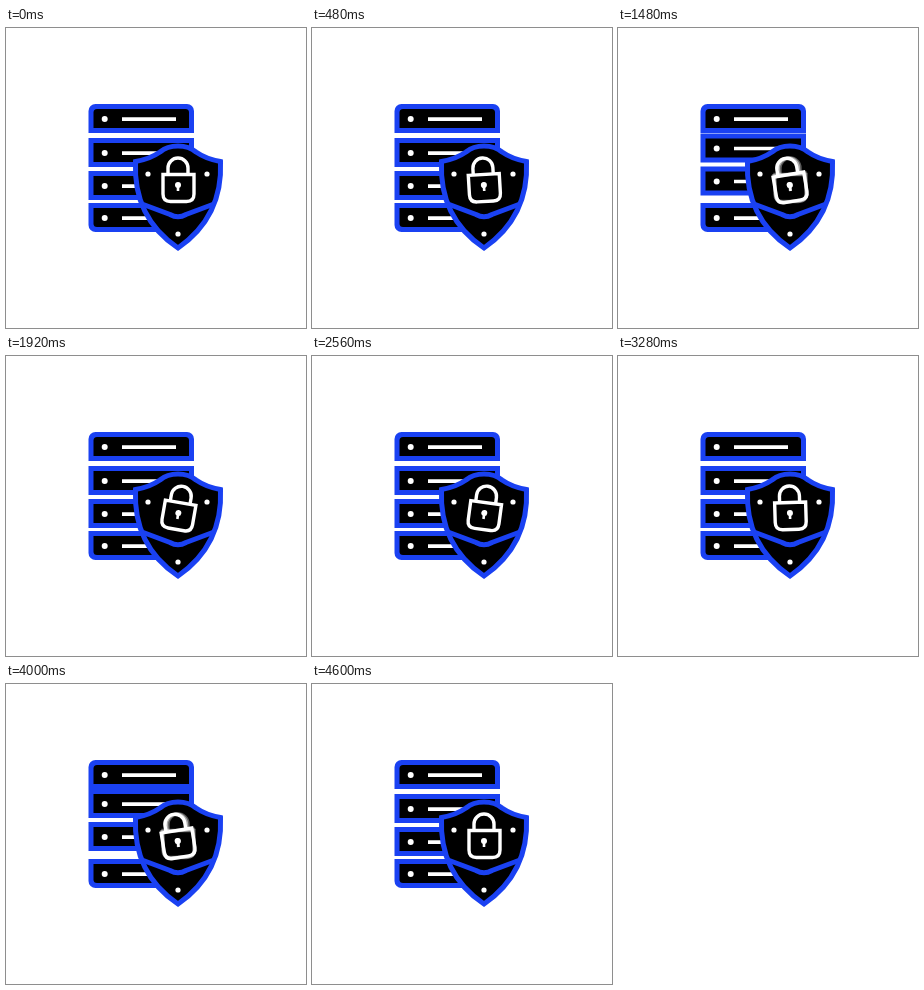
Animation, 300 px wide and 300 px high, one loop 4880 ms. Source, as an HTML page with a canvas:

```html
<!DOCTYPE html>
<html lang="en">
<head>
<meta charset="utf-8">
<title>Server security</title>
<style>
html, body { margin: 0; width: 100%; height: 100%; overflow: hidden; background: #fff; }
canvas { display: block; width: 300px; height: 300px; }
</style>
</head>
<body>
<canvas id="stage"></canvas>
<script>
const LOOP = 4880, HALF = 2440, STEP = 40;
const SWING = 864, SWING_END = 2160, TILT = 10 * Math.PI / 180;
const SHIFT = 5, SHIFT_START = 840, SHIFT_END = 1700;
const BLUE = '#1a41f2', BLACK = '#000', WHITE = '#fff';

const canvas = document.getElementById('stage');
const ratio = window.devicePixelRatio || 1;
canvas.width = canvas.height = 300 * ratio;
const ctx = canvas.getContext('2d');
ctx.scale(ratio, ratio);

const shield = new Path2D(
  'M172 118 Q183 118 190 124 Q200 131 214.5 133.5 C216 166 205 197 172 220 ' +
  'C138 197 128 166 129.5 133.5 Q144 131 154 124 Q161 118 172 118Z');
const chevron = new Path2D('M136 176 L164 186.5 Q172 191 180 186.5 L208 176');
const shackle = new Path2D('M162 146 V140 A10 10 0 0 1 182 140 V146');
const body = new Path2D('M157 146.5 H188 V166 Q188 173.5 180.5 173.5 H164.5 Q157 173.5 157 166Z');
const stem = new Path2D('M172 158 V163');

function dot(x, y, r) {
  ctx.fillStyle = WHITE;
  ctx.beginPath();
  ctx.arc(x, y, r, 0, 2 * Math.PI);
  ctx.fill();
}

function line(path, color, width) {
  ctx.strokeStyle = color;
  ctx.lineWidth = width;
  ctx.stroke(path);
}

function box(x, y, w, h, radii, color) {
  ctx.fillStyle = color;
  ctx.beginPath();
  ctx.roundRect(x, y, w, h, radii);
  ctx.fill();
}

function drawBar(y, top, bottom) {
  const radii = r => [top * r, top * r, bottom * r, bottom * r];
  box(82.5, y, 105.5, 29, radii(7), BLUE);
  box(87.5, y + 5, 95.5, 19, radii(3.5), BLACK);
  dot(98.7, y + 15, 3);
  box(116, y + 13.3, 54, 3.6, 0, WHITE);
}

function drawLock(angle, alpha) {
  ctx.save();
  ctx.globalAlpha = alpha;
  ctx.translate(172, 159);
  ctx.rotate(angle);
  ctx.translate(-172, -159);
  line(shackle, WHITE, 3.4);
  line(body, WHITE, 3.4);
  dot(172, 157, 3);
  line(stem, WHITE, 2.6);
  ctx.restore();
}

// Quick push down, slow glide up, quick return; antisymmetric in time.
function barShift(t) {
  if (t <= SHIFT_START || t >= SHIFT_END) return 0;
  const edge = 140;
  const quick = d => SHIFT * Math.sin(Math.PI / 2 * d / edge);
  if (t < SHIFT_START + edge) return quick(t - SHIFT_START);
  if (t > SHIFT_END - edge) return -quick(SHIFT_END - t);
  const u = (t - SHIFT_START - edge) / (SHIFT_END - SHIFT_START - 2 * edge);
  return SHIFT * Math.cos(Math.PI * u);
}

function lockAngle(t) {
  return t < SWING_END ? TILT * Math.sin(2 * Math.PI * t / SWING) : 0;
}

function draw(time) {
  const t = Math.floor(time % LOOP / STEP) * STEP % HALF;
  const shift = barShift(t), angle = lockAngle(t);

  ctx.fillStyle = WHITE;
  ctx.fillRect(0, 0, 300, 300);
  drawBar(76, 1, 0);
  drawBar(175, 0, 1);
  drawBar(110 + shift, 0, 0);
  drawBar(143 + shift, 0, 0);

  ctx.fillStyle = BLACK;
  ctx.fill(shield);
  line(chevron, BLUE, 5);
  line(shield, BLUE, 5);
  dot(142, 146, 2.6);
  dot(201, 146, 2.6);
  dot(172, 206, 2.6);

  // The second swing to the left leaves a soft trail.
  if (t > SWING * 1.5 && t < SWING * 2) {
    drawLock(0, 0.35);
    drawLock(angle / 2, 0.5);
  }
  drawLock(angle, 1);
}

let start;
function tick(now) {
  if (start === undefined) start = now;
  draw(now - start);
  requestAnimationFrame(tick);
}
draw(0);
requestAnimationFrame(tick);
</script>
</body>
</html>
```
